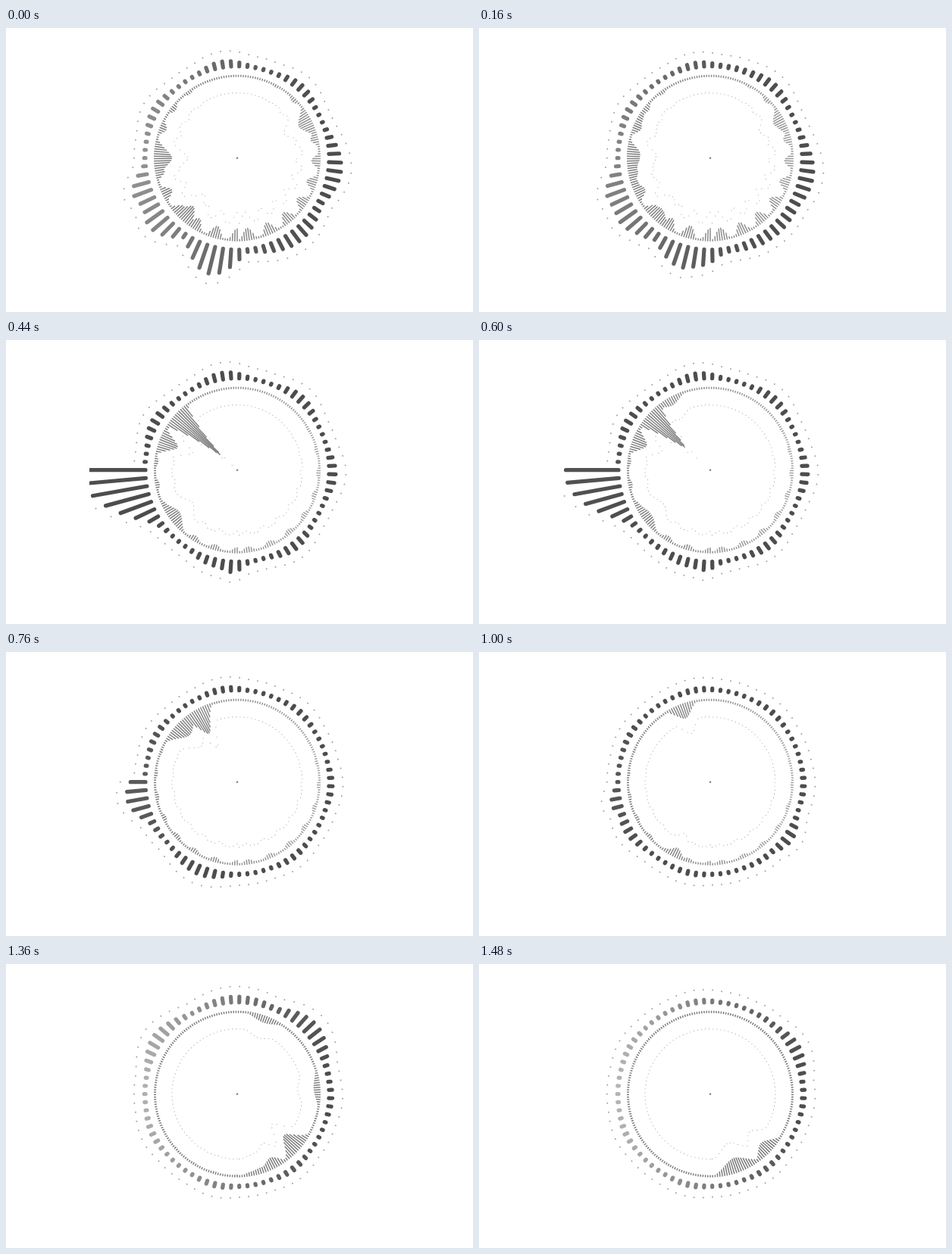
Animation, 616 px wide and 375 px high, one loop 1.52 s. Source, as an HTML page with a canvas:

```html
<!DOCTYPE html>
<html lang="en">
<head>
<meta charset="utf-8">
<title>Circular visualizer</title>
<style>
html, body { margin: 0; width: 616px; height: 375px; overflow: hidden; background: #fff; }
canvas { display: block; }
</style>
</head>
<body>
<canvas id="stage" width="616" height="375"></canvas>
<script>
const ctx = document.getElementById('stage').getContext('2d');
const LOOP = 1520, STEP = 40, CX = 305, CY = 171.7;
const BARS = 71, SPIKES = 3 * BARS;

// Each ring is an even ripple plus a few dominant peaks: [centre, height, half width].
// Bars are placed by index, spikes by degrees; both run clockwise from the left.
const ring = (ripple, ...peaks) => ({ ripple, peaks });
const moods = [
  { at: 0, glow: 68,
    bars: ring(8, [37, 17, 7], [46, 16, 8], [56, 36, 5], [63.5, 26, 5], [67, 24, 4]),
    spikes: ring(17, [-48, 24, 12], [0, 24, 17], [153, 19, 15]) },
  { at: 280, glow: 26,
    bars: ring(3, [24, 12, 8], [40, 21, 8], [53, 20, 3], [59, 19, 7], [65.5, 28, 6]),
    spikes: ring(18, [-19, 25, 16], [27, 20, 14]) },
  { at: 440, glow: 1,
    bars: ring(9, [54, 14, 3], [71, 86, 8]),
    spikes: ring(8, [-36, 16, 18], [21, 26, 12], [42, 80, 12]) },
  { at: 760, glow: 14,
    bars: ring(5, [58, 11, 6], [69.4, 26, 5]),
    spikes: ring(7, [45, 22, 20], [60, 36, 14]) },
  { at: 1000, glow: 10,
    bars: ring(4, [42.5, 11, 4], [65, 9, 5], [68.5, 12, 3]),
    spikes: ring(6, [-64, 13, 10], [69, 20, 14]) },
  { at: 1200, glow: 95,
    bars: ring(5, [7, 18, 6], [18, 10, 8], [27, 23, 6]),
    spikes: ring(4, [110, 13, 18], [176, 12, 18], [221, 34, 14], [242, 16, 11]) },
  { at: 1480, glow: 103,
    bars: ring(4, [30, 12, 6]),
    spikes: ring(3, [224, 17, 16], [250, 20, 22]) }
];

const mix = (a, b, p) => a + (b - a) * p;
const gray = v => `rgb(${v},${v},${v})`;
const bell = d => d < 1 ? (1 - d) ** 2 * (1 + 2 * d) : 0;
const comb = (pos, phase, period) => Math.cos(Math.PI * (pos - phase) / period) ** 2;
const tallest = (peaks, pos) =>
  Math.max(0, ...peaks.map(([c, h, w]) => h * bell(Math.abs(pos - c) / w)));

const barLength = ({ ripple, peaks }, i) =>
  Math.max(1.7, ripple * comb(i, 6, 10), tallest(peaks, i));

// The inner ripple is strongest at the bottom and fades out at the top.
const spikeLength = ({ ripple, peaks }, degrees) => {
  const depth = Math.sqrt((1 - Math.sin(degrees * Math.PI / 180)) / 2);
  return Math.max(3, ripple * depth * comb(degrees, 262, 16), tallest(peaks, degrees));
};

function ray(angle, from, to, width, shade) {
  const x = -Math.cos(angle), y = -Math.sin(angle);
  ctx.strokeStyle = gray(shade);
  ctx.lineWidth = width;
  ctx.beginPath();
  ctx.moveTo(CX + x * from, CY + y * from);
  ctx.lineTo(CX + x * to, CY + y * to);
  ctx.stroke();
}

function dot(angle, radius, size, shade) {
  ctx.fillStyle = gray(shade);
  ctx.beginPath();
  ctx.arc(CX - Math.cos(angle) * radius, CY - Math.sin(angle) * radius, size, 0, 2 * Math.PI);
  ctx.fill();
}

function draw(time) {
  const next = Math.max(1, moods.findIndex(m => m.at >= time));
  const a = moods[next - 1], b = moods[next];
  const p = ((time - a.at) / (b.at - a.at)) ** 2;
  const glow = mix(a.glow, b.glow, p);
  const tick = 165 - glow * glow / 250;

  ctx.fillStyle = '#fff';
  ctx.fillRect(0, 0, 616, 375);
  ctx.save();
  ctx.beginPath();
  ctx.rect(110, 0, 396, 375);
  ctx.clip();

  ctx.lineCap = 'round';
  for (let i = 1; i <= BARS; i++) {
    const angle = i / BARS * 2 * Math.PI;
    const left = (1 + Math.cos(angle)) / 2;
    const length = mix(barLength(a.bars, i), barLength(b.bars, i), p);
    ray(angle, 121, 121 + length, 5.2, 77 + glow * left ** (120 / glow));
    dot(angle, 134.5 + length, 1, 160);
  }

  ctx.lineCap = 'butt';
  for (let i = 0; i < SPIKES; i++) {
    const degrees = i * 360 / SPIKES - 90;
    const angle = degrees * Math.PI / 180;
    const left = (1 + Math.cos(angle)) / 2;
    const length = mix(spikeLength(a.spikes, degrees), spikeLength(b.spikes, degrees), p);
    ray(angle, 110, 110 - length, 1.5, mix(tick, 125, left));
    if (i % 2 === 0) dot(angle, 89 - length, 0.6, 165);
  }
  ctx.restore();
  dot(0, 0, 1.3, 130);
}

function loop() {
  const t = performance.now() % LOOP;
  draw(t < 2 * STEP ? 0 : Math.floor(t / STEP) * STEP);
  requestAnimationFrame(loop);
}
loop();
</script>
</body>
</html>
```
